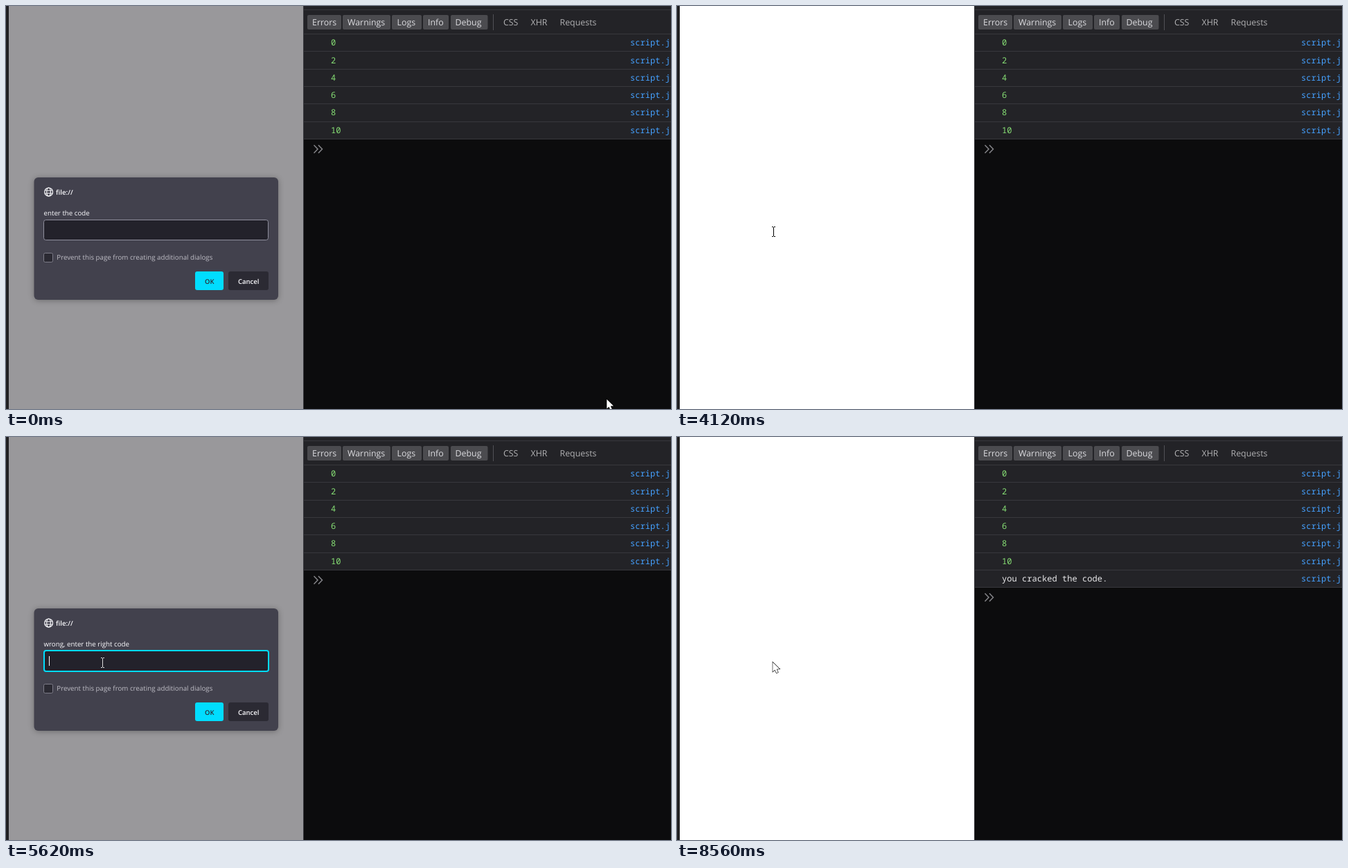
Write an HTML page with a canvas that moves like this. It is 960 by 583 pixels and loops after 9490 ms.

```html
<!DOCTYPE html>
<html lang="en">
<head>
<meta charset="utf-8">
<title>Prompt and console</title>
<style>
html, body { margin: 0; width: 100%; height: 100%; overflow: hidden; background: #0c0c0d; }
canvas { display: block; }
</style>
</head>
<body>
<canvas id="stage" width="960" height="583"></canvas>
<script>
const LOOP = 9490;
const ctx = document.getElementById('stage').getContext('2d');
const SANS = '"Open Sans", "Noto Sans", sans-serif';
const MONO = '"Noto Sans Mono", "DejaVu Sans Mono", monospace';
const ROW = 25.3;
const INPUT_X = 62;

// Each run types a string, its characters spread over steps from start to end.
const typing = [
  { from: 1030, to: 1850, text: 'adhuwdghasd' },
  { from: 3110, to: 3320, text: 'awdh' },
  { from: 3650, to: 3720, text: 'do' },
  { from: 3920, to: 3990, text: 'as' },
  { from: 4600, to: 4740, text: 'asfh', steps: 3 },
  { from: 4940, to: 5010, text: '8912', steps: 2 },
  { from: 5210, to: 5480, text: 'edas' },
  { from: 5950, to: 6220, text: 'sec' },
  { from: 6490, to: 6820, text: 'ret' },
  { from: 7150, to: 7490, text: 'code' },
  { from: 7760, to: 8020, text: '123' }
];
const clears = [0, 2580, 4120, 5550, 8490];
const within = (t, a, b) => t >= a && t < b;

function typedText(t) {
  const start = clears.filter(c => c <= t).pop();
  let out = '';
  for (const { from, to, text, steps = text.length } of typing) {
    if (from < start || from > t) continue;
    const gap = (to - from) / (steps - 1);
    const step = Math.min(steps, Math.floor((t - from) / gap + 1e-6) + 1);
    out += text.slice(0, Math.round(text.length * step / steps));
  }
  return out;
}

function rect(x, y, w, h, color) {
  ctx.fillStyle = color;
  ctx.fillRect(x, y, w, h);
}

function box(x, y, w, h, r, fill, stroke, line = 1) {
  ctx.beginPath();
  ctx.roundRect(x, y, w, h, r);
  ctx.fillStyle = fill;
  ctx.fill();
  if (stroke) {
    ctx.strokeStyle = stroke;
    ctx.lineWidth = line;
    ctx.stroke();
  }
}

function label(str, x, y, size, color, family = SANS, weight = 400) {
  ctx.font = `${weight} ${size}px ${family}`;
  ctx.fillStyle = color;
  ctx.fillText(str, x, y);
}

function path(points, color, width, close) {
  ctx.beginPath();
  points.forEach(([x, y]) => ctx.lineTo(x, y));
  if (close) ctx.closePath();
  ctx.strokeStyle = color;
  ctx.lineWidth = width;
  ctx.stroke();
}

function drawConsole(solved) {
  const rows = solved ? 7 : 6;
  const end = Math.round(40 + rows * ROW);
  rect(429, 0, 531, 583, '#0c0c0d');
  rect(430, 0, 530, end, '#232327');
  rect(429, 0, 1, 583, '#38383d');
  rect(430, 5, 530, 1, '#38383d');

  const filters = [['Errors', 435, 49, 442], ['Warnings', 486, 69, 493],
    ['Logs', 557, 43, 564.5], ['Info', 602, 37, 609], ['Debug', 642, 53.5, 648.5]];
  for (const [name, x, w, tx] of filters) {
    box(x, 13, w, 21, 2, '#4b4b4f');
    label(name, tx, 28.3, 12.4, '#dcdce0');
  }
  rect(703, 12, 1, 23, '#515156');
  [['CSS', 718], ['XHR', 757.5], ['Requests', 799.5]]
    .forEach(([name, x]) => label(name, x, 28.3, 12.4, '#b1b1b3'));

  for (let i = 0; i <= rows; i++) rect(430, Math.round(40 + i * ROW), 530, 1, '#38383d');
  for (let i = 0; i < rows; i++) {
    const y = Math.round(57.2 + i * ROW);
    if (i < 6) label(String(i * 2), 469, y, 12.1, '#86de74', MONO);
    else label('you cracked the code.', 469, y, 12.1, '#e8e8ea', MONO);
    label('script.js:' + (i < 6 ? 4 : 14), 901, y, 12.1, '#45a1ff', MONO);
  }
  const y = end + 15;
  for (const x of [444.5, 451])
    path([[x, y - 5.7], [x + 5.5, y], [x, y + 5.7]], '#858589', 1.5);
}

function drawGlobe(x, y) {
  ctx.strokeStyle = '#fbfbfe';
  ctx.lineWidth = 1.1;
  for (const rx of [6, 2.8]) {
    ctx.beginPath();
    ctx.ellipse(x, y, rx, 6, 0, 0, Math.PI * 2);
    ctx.stroke();
  }
  for (const dy of [-2, 2]) path([[x - 5.6, y + dy], [x + 5.6, y + dy]], '#fbfbfe', 1);
}

function drawDialog(t) {
  ctx.save();
  ctx.shadowColor = 'rgba(0,0,0,.3)';
  ctx.shadowBlur = 9;
  ctx.shadowOffsetY = 1;
  box(40.5, 248, 352.5, 177, 6, '#42414d');
  ctx.restore();

  drawGlobe(61.6, 269);
  label('file://', 72, 273, 9.7, '#fbfbfe', SANS, 600);
  label(t < 2580 ? 'enter the code' : 'wrong, enter the right code', 54.5, 303.3, 9.75, '#fbfbfe');

  if (t < 680) box(54.5, 309.5, 324, 29, 3, '#23222b', '#8f8f9d');
  else box(55, 309, 324, 30, 3, '#23222b', '#00ddff', 2);
  const text = typedText(t);
  label(text, INPUT_X, 328, 9.5, '#fbfbfe');
  const caretOff = t < 680 || within(t, 2310, 2650) || t >= 8290;
  if (!caretOff) rect(Math.round(INPUT_X + ctx.measureText(text).width), 317, 1, 14, '#fbfbfe');

  box(54.5, 357.5, 13, 13, 2, '#2b2a33', '#7d7c88');
  label('Prevent this page from creating additional dialogs', 73.3, 367.3, 9.75, '#bebdc5');
  box(273, 384, 41, 27, 3, '#00ddff');
  label('OK', 287, 401.7, 9.4, '#2b2a33', SANS, 600);
  box(321, 384, 58, 27, 3, '#2b2a33');
  label('Cancel', 335, 401.7, 9.5, '#fbfbfe', SANS, 600);
}

function drawArrow(x, y) {
  const shape = [[0, 0], [0, 13.5], [3.1, 10.7], [5.3, 15.4], [7.6, 14.4], [5.5, 9.8], [9.7, 9.5]];
  ctx.save();
  ctx.translate(x + 0.3, y);
  path(shape, '#000', 1.2, true);
  ctx.fillStyle = '#fff';
  ctx.fill();
  ctx.restore();
}

function drawBeam(x, y, color) {
  rect(x, y - 6, 1, 13, color);
  for (const dy of [-7, 7]) {
    rect(x - 2, y + dy, 2, 1, color);
    rect(x + 1, y + dy, 2, 1, color);
  }
}

function drawPointer(t, open) {
  const step = t < 70 ? 0 : Math.min(8, Math.floor((t - 70) / 67.14 + 1e-6) + 1);
  if (step < 8) {
    const p = step / 8;
    const k = p * p * (3 - 2 * p);
    drawArrow(867 - 739 * k, 569 - 247 * k);
  } else if (t >= 8420) drawArrow(138, 326);
  else if (t < 820) drawBeam(128, 322, '#dcdcdc');
  else drawBeam(139, 326, open ? '#dcdcdc' : '#000');
}

function draw(t) {
  const open = !(within(t, 4120, 4190) || within(t, 5550, 5620) || t >= 8490);
  ctx.textRendering = 'geometricPrecision';
  rect(0, 0, 4, 583, '#202022');
  rect(4, 0, 425, 583, open ? '#99989b' : '#fff');
  drawConsole(t >= 8560);
  if (open) drawDialog(t);
  drawPointer(t, open);
}

let origin = null;
function tick(now) {
  if (origin === null) origin = now;
  draw((now - origin) % LOOP);
  requestAnimationFrame(tick);
}
draw(0);
requestAnimationFrame(tick);
</script>
</body>
</html>
```
